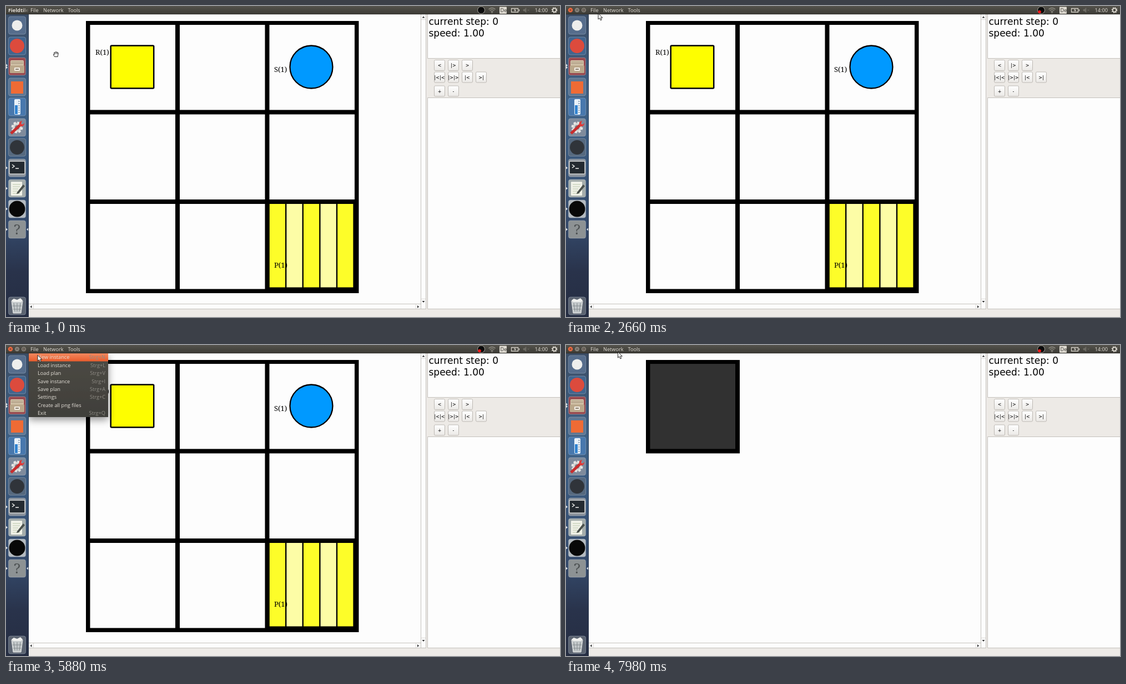
Animation of 998x561 px, one loop 8 s. Source, as an HTML page:

```html
<!DOCTYPE html>
<html lang="en">
<head>
<meta charset="utf-8">
<title>Grid planner</title>
<style>
html, body { margin: 0; width: 100%; height: 100%; overflow: hidden; background: #fdfdfd; }
svg { display: block; width: 100vw; height: 100vh; }
.ui { font: 9.2px "Open Sans", "Noto Sans", sans-serif; fill: #e4e0d8; white-space: pre; }
.title { font-weight: 700; }
.key { fill: #8f8c85; text-anchor: end; }
.serif { font: 13px "Noto Serif", serif; }
.info { font: 17px "DejaVu Sans", sans-serif; }
.btn { font: 8px "DejaVu Sans", sans-serif; text-anchor: middle; }
</style>
</head>
<body>
<svg viewBox="0 0 998 561" preserveAspectRatio="none">
<defs>
  <linearGradient id="panelFill" x2="0" y2="1"><stop stop-color="#55534c"/><stop offset="1" stop-color="#3b3a35"/></linearGradient>
  <linearGradient id="dockFill" x2="0" y2="1">
    <stop stop-color="#3b4d66"/><stop offset=".3" stop-color="#3d6187"/><stop offset=".7" stop-color="#34496a"/>
    <stop offset=".85" stop-color="#29334b"/><stop offset="1" stop-color="#252d42"/>
  </linearGradient>
  <linearGradient id="menuFill" x2="0" y2="1"><stop stop-color="#4c4a45"/><stop offset="1" stop-color="#403f3a"/></linearGradient>
  <linearGradient id="hotFill" x2="0" y2="1"><stop stop-color="#f3895f"/><stop offset="1" stop-color="#e95c2c"/></linearGradient>
  <linearGradient id="btnFill" x2="0" y2="1"><stop stop-color="#fff"/><stop offset="1" stop-color="#ebe9e6"/></linearGradient>
  <linearGradient id="tailFill" gradientUnits="userSpaceOnUse" x1="30" x2="41"><stop stop-color="#e4e0d8"/><stop offset="1" stop-color="#e4e0d8" stop-opacity="0"/></linearGradient>
  <filter id="shadow" x="-30%" y="-30%" width="160%" height="170%"><feDropShadow dx="0" dy="5" stdDeviation="7" flood-opacity=".42"/></filter>
</defs>

<rect width="998" height="561" fill="#fdfdfd"/>
<g id="board"></g>
<g id="node">
  <rect x="144" y="27" width="169" height="168.5"/>
  <rect x="151.5" y="34" width="153.5" height="153.5" fill="#313131"/>
</g>

<g id="chrome">
  <rect x="41" y="547" width="957" height="14" fill="#edeae7"/>
  <rect x="756" y="15" width="3.5" height="532" fill="#edeae7"/>
  <rect x="759" y="94" width="239" height="72" fill="#edeae6"/>
  <path d="M747.5 15V547M756.5 15V547M41 537.5H748M41 546.5H757M759.5 15V94.5H998M998 165.5H759.5V546.5H998" fill="none" stroke="#c4c1bc"/>
  <path d="M748 24.5H756M748 528.5H756M49.5 538V546M738.5 538V546" stroke="#dedbd7"/>
  <path d="M749.5 21.5h5l-2.5-3zM749.5 532h5l-2.500 3zM46.500 540v5l-3-2.500zM741 540v5l3-2.500z" fill="#333"/>
</g>
<g id="controls">
  <text class="info" x="761.5" y="34">current step: 0</text>
  <text class="info" x="761.5" y="55">speed: 1.00</text>
</g>

<g id="menu">
  <rect x="41" y="15" width="143" height="115" fill="url(#menuFill)" filter="url(#shadow)"/>
  <rect id="hot" x="41" y="15" width="143" height="14.500" fill="url(#hotFill)"/>
</g>

<rect y="15" width="41" height="546" fill="url(#dockFill)"/>
<path d="M40.500 15V561" stroke="#253349" opacity=".7"/>
<g id="dock"></g>

<rect width="998" height="15" fill="url(#panelFill)"/>
<path d="M0 14.700H998" stroke="#2d2c28" stroke-width=".7"/>
<text id="title" class="ui title" x="4" y="10.500">Fieldtiler</text>
<text id="titleCut" class="ui title" x="4" y="10.500" style="fill:url(#tailFill)">Fieldtiler</text>
<g id="bar" class="ui">
  <text x="44" y="10.500">File</text><text x="67" y="10.500">Network</text><text x="111.500" y="10.500">Tools</text>
</g>
<g id="winButtons" stroke="#45433e" stroke-width=".9">
  <circle cx="8" cy="7.300" r="4.600" fill="#ec6a41"/>
  <circle cx="20" cy="7.300" r="4.600" fill="#85827a"/>
  <circle cx="32" cy="7.300" r="4.600" fill="#85827a"/>
  <path d="M6.300 5.600l3.400 3.400m0-3.400l-3.400 3.400M18 7.300h4M30.300 5.700h3.400v3.200h-3.400z" fill="none" stroke="#4b3a33"/>
</g>
<g id="tray">
  <circle cx="856" cy="7.500" r="6.500" fill="#0b0b0b" stroke="#bebbb3" stroke-width=".8"/>
  <circle id="rec" cx="853" cy="10.500" r="2.800" fill="#f01414"/>
  <g fill="none" stroke="#98958c" stroke-width="1.300">
    <path d="M869.500 6q6-5 12 0M871.500 8.300q4-3.300 8 0M873.500 10.500q2-1.600 4 0"/>
    <path d="M910.500 4.500h12v6.500h-12zM924.500 6v3.500" stroke="#d5d1c8"/>
  </g>
  <circle cx="875.500" cy="12" r="1" fill="#98958c"/>
  <path d="M917.500 4.500l-3 3.500h2.500l-1 3 3.500-4h-2.500z" fill="#d5d1c8"/>
  <rect x="889" y="1.500" width="13" height="12.500" rx="1" fill="#dfdbd2"/>
  <text class="ui" x="890.500" y="11" style="fill:#3b3a35">De</text>
  <path d="M932 6h2l3-2.500v8l-3-2.500h-2zM939 5.500l4 4m0-4l-4 4" fill="#6d6b64" stroke="#6d6b64" stroke-width=".8"/>
  <text class="ui" x="952.500" y="10.500">14:00</text>
  <circle cx="988" cy="7.500" r="3.200" fill="none" stroke="#e4e0d8" stroke-width="1.500"/>
  <circle cx="988" cy="7.500" r="4.500" fill="none" stroke="#e4e0d8" stroke-width="1.800" stroke-dasharray="1.700 1.834"/>
</g>

<g id="cursor">
  <path id="arrow" d="M0 0V10.500L2.500 8.300 4.300 12.300 6.200 11.500 4.500 7.700H7.800Z" fill="#fff" stroke="#111" stroke-width=".9" stroke-linejoin="round"/>
  <path id="hand" d="M-2.500 4.500L-4.700.8Q-4.500-.8-2.700.6L-3.600-2.500Q-2.900-4-1.800-2.700L-1.300-3.900Q0-4.900.8-3.700L2-3.900Q3-3.800 2.900-2.600 4.500-2.900 4.400-1.400L3.200 3V4.500ZM-1.800-2.700L-1.100-.5M.8-3.700L.8-.7M2.900-2.600L2.400-.4" fill="#fff" stroke="#111" stroke-width=".9" stroke-linejoin="round"/>
</g>
</svg>
<script>
const LOOP = 8000;
const $ = id => document.getElementById(id);
const add = (id, markup) => $(id).insertAdjacentHTML('beforeend', markup);
const rect = (x, y, w, h, fill, more = '') =>
  `<rect x="${x}" y="${y}" width="${w}" height="${h}" fill="${fill}" ${more}/>`;
const text = (cls, x, y, s) =>
  `<text class="${cls}" x="${x}" y="${y}">${s.replace(/</g, '&lt;')}</text>`;

function buildBoard() {
  let out = rect(144, 27, 491.5, 491, '#000');
  for (let i = 0; i < 9; i++)
    out += rect(151.5 + 161.5 * (i % 3), 34 + 161.5 * Math.floor(i / 3), 153.5, 153.5, i < 8 ? '#fdfdfd' : '#000');
  for (let i = 0; i < 5; i++)
    out += rect(474.8 + 30.6 * i, 357, 28.2, 150.5, i % 2 ? '#fdfda6' : '#fdfd29');
  out += rect(188.7, 71.5, 77.5, 77, '#fefe00', 'rx="1.5" stroke="#000" stroke-width="2.5"');
  out += '<circle cx="550" cy="110" r="38.5" fill="#0099ff" stroke="#000" stroke-width="2.3"/>';
  out += text('serif', 161, 88, 'R(1)') + text('serif', 483, 118.5, 'S(1)') + text('serif', 483, 472, 'P(1)');
  add('board', out);
}

function buildControls() {
  const rows = [[107, ['<', '|>', '>']], [128.5, ['|<|<', '|>|>', '|<', '>|']], [153.5, ['+', '-']]];
  for (const [y, labels] of rows)
    labels.forEach((label, i) => {
      const x = 781 + 25 * i;
      add('controls', rect(x - 9.5, y - 9.5, 19, 19, 'url(#btnFill)', 'rx="2" stroke="#bdb9b4"') + text('btn', x, y + 3, label));
    });
}

function buildMenu() {
  const items = ['New instance:N', 'Load instance:L', 'Load plan:V', 'Save instance:I',
    'Save plan:A', 'Settings:C', 'Create all png files:', 'Exit:Q'];
  items.forEach((item, i) => {
    const [name, key] = item.split(':'), y = 25.4 + 14.4 * i;
    add('menu', text('ui', 57, y, name) + (key ? text('ui key', 179, y, 'Strg+' + key) : ''));
  });
}

// Icons are drawn around their tile's centre.
const disc = (r, fill) => `<circle r="${r}" fill="${fill}"/>`;
const path = (d, fill, stroke = 'none', w = 1) =>
  `<path d="${d}" fill="${fill}" stroke="${stroke}" stroke-width="${w}"/>`;
const icons = [
  [35, '#566d8c', disc(9.5, '#eeeeec')],
  [72, '#41658e', disc(13, '#dc4b3d')],
  [109, '#994a50', rect(-12, -11, 24, 11, '#d8c9ae', 'rx="2"') + rect(-13, -2, 26, 14, '#bba88b', 'rx="1.5"') +
    path('M-11-8H11M-11-5H11', 'none', '#8f7d66') + rect(-5, 2, 10, 6, '#f2ede3', 'rx="1"') + path('M-3 5H3', 'none', '#665744', 1.5)],
  [146, '#5f7793', rect(-11, -10, 22, 22, '#ef6b35')],
  [182, '#4878ad', rect(-5, -14, 11, 28, '#e9f2fa', 'rx="2"') + rect(-4, -3, 5, 16, '#3283d0') +
    path('M2-10H5M2-6H5M2-2H5M2 2H5M2 6H5M2 10H5', 'none', '#52718f')],
  [219, '#7f8b9c', '<circle r="8.5" fill="#d3d3d1" stroke="#e6e6e4" stroke-width="4" stroke-dasharray="4 2.7"/>' + disc(4, '#77818e') +
    path('M-11 11L5-4', 'none', '#c92d2d', 5) + path('M4-4Q2-11 9-12L7-7 10-5 13-8Q13-1 6-2Z', '#dc3a38')],
  [255, '#56697f', disc(13, '#30343a')],
  [292, '#8b929b', rect(-14, -12, 28, 23, '#242a30', 'rx="1.5" stroke="#d4d5d3" stroke-width="1.500"') +
    path('M-9-6L-5-3L-9 0M-3 1H3', 'none', '#f1f1ee', 1.5)],
  [329, '#a5adab', rect(-11, -12, 20, 25, '#f1f2e9', 'rx="1"') + path('M-8-7H6M-8-3H5M-8 1H2M-8 5H1M-8 9H5', 'none', '#b9c6a9') +
    path('M0 7L11-7L14-4L3 9L-1 10Z', '#4b514c')],
  [366, '#b5bbc0', disc(14.5, '#080808')],
  [403, '#8d9294', '<text y="9" text-anchor="middle" font-family="Noto Serif, serif" font-size="25" fill="#4c5052">?</text>'],
  [541, '#5c6471', path('M-10-9H10L7 13H-7Z', '#c4c9cb', '#e8eae9') + path('M-6-5L-4 10M0-5V10M6-5L4 10M-8 0H8M-7 6H7', 'none', '#82898d') +
    path('M-10-10L-6-13 0-11 6-14 10-10 7-7H-7Z', '#eff0ee')]
];

function buildDock() {
  for (const [y, tile, art] of icons)
    add('dock', `<g transform="translate(20 ${y})">` +
      rect(-15.5, -16, 31, 32, tile, 'rx="3.5" stroke="#a9b8c9" stroke-opacity=".45"') + art + '</g>');
  for (const y of [107, 111, 292, 329, 366, 403])
    add('dock', path(`M0 ${y - 2.500}L3 ${y}L0 ${y + 2.500}Z`, '#e4e8ec'));
  add('dock', path('M40 400.500L37 403L40 405.500Z', '#e4e8ec'));
}

const ramp = (t, a, b) => Math.min(1, Math.max(0, (t - a) / (b - a)));
const smooth = u => u * u * (3 - 2 * u);

// Pointer stops: time, x, y
const stops = [
  [0, 90, 87], [820, 90, 87], [1380, 75, 69.5], [1660, 75, 69.5], [2380, 68, 27], [2650, 58, 13.5],
  [2900, 58, 13.5], [3240, 55, 11], [4220, 55, 11], [4700, 57, 18], [6700, 57, 18.5],
  [7000, 143, 88], [7380, 73, 32], [7540, 73, 32], [7960, 93.5, 12.5], [LOOP, 93.5, 12.5]
];

function pointer(t) {
  const i = stops.findIndex(s => s[0] > t);
  const [t0, x0, y0] = stops[i - 1], [t1, x1, y1] = stops[i];
  const u = smooth(ramp(t, t0, t1));
  return [x0 + (x1 - x0) * u, y0 + (y1 - y0) * u];
}

function show(id, alpha) {
  $(id).setAttribute('opacity', +alpha);
}

function draw(t) {
  const appear = ramp(t, 2480, 2620);
  const bar = Math.max(1 - ramp(t, 100, 420), appear);
  show('bar', bar);
  show('title', 1 - bar);
  show('titleCut', t < 1000 ? bar : 0);
  show('winButtons', appear);
  show('rec', t >= 900);

  const fadeIn = 1 - (1 - ramp(t, 3340, 3580)) ** 2;
  show('menu', fadeIn * (1 - ramp(t, 6180, 6335)));
  show('hot', t >= 4460);
  show('board', t < 6140);
  show('node', t >= 6140);

  const [x, y] = pointer(t);
  const hand = y >= 15 && !(t > 3340 && t < 6180);
  $('cursor').setAttribute('transform', `translate(${x} ${y})`);
  show('hand', hand);
  show('arrow', !hand);
}

buildBoard();
buildControls();
buildMenu();
buildDock();

const start = performance.now();
function frame() {
  draw((performance.now() - start) % LOOP);
  requestAnimationFrame(frame);
}
frame();
</script>
</body>
</html>
```
